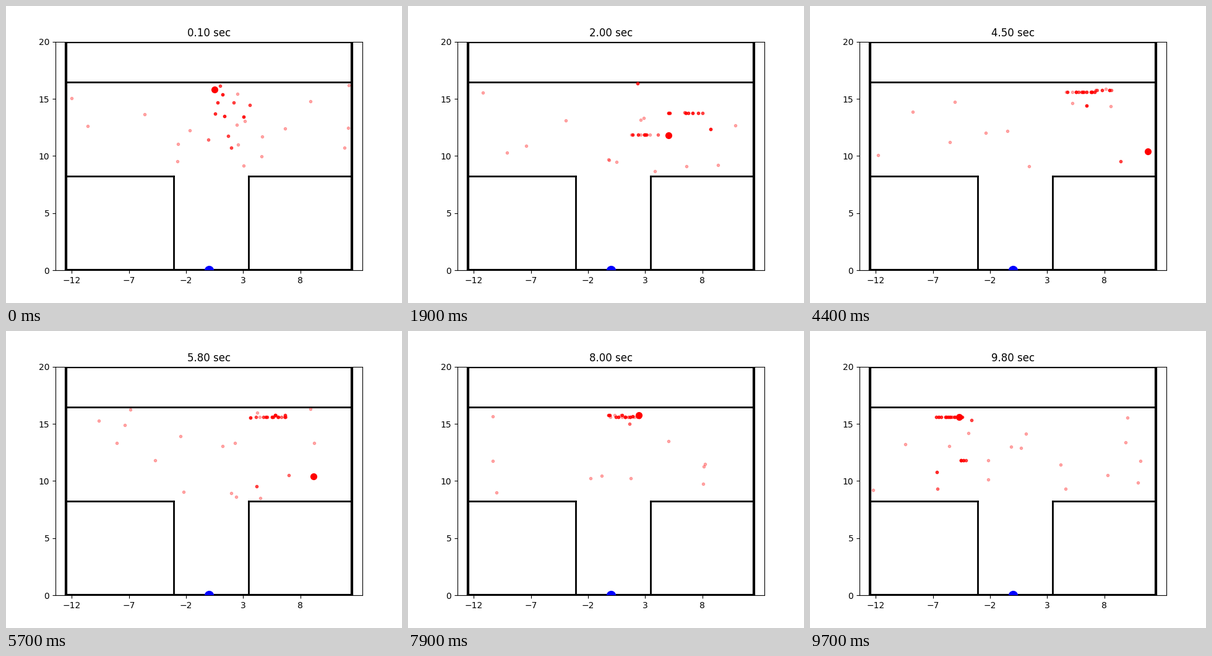
Recreate the animation shown at these times as a matplotlib script. Size 640x480 px, loop 9800 ms.

```python
import matplotlib.pyplot as plt
import numpy as np
from matplotlib.animation import FuncAnimation

FRAMES, INTERVAL = 98, 100
SIDE, TOP, MID = 12.5, 16.45, 8.225
INNER = (-3.07, 3.47)
FLOOR, CEILING = 8.5, 16.35  # heights that particles may take

# Path of the best estimate: x glides, y jumps from lane to lane
STEPS = [0, 9, 28, 44, 70, 88, 97]
BEST_X = [0.46, 3.1, 6.74, 11.77, 6.57, -1.66, -4.73]
BEST_Y = [15.81, 11.82, 15.76, 10.4, 15.76, 11.82, 15.6]

# Centre of the whole cloud
CENTRE = [(0, 1), (9, 2.9), (28, 8), (44, 6.2), (70, 5.4), (88, -1.9), (97, -5.2)]

# Resampled particles slide along lanes: height, count, (step, x) from start to end
LANES = [
    (11.86, 11, [(3, 1.5), (9, 2.6), (28, 3.3), (35, 3.6)]),
    (13.75, 7, [(3, 1.5), (9, 3.6), (28, 9), (34, 10.5)]),
    (14.8, 4, [(2, 1), (14, 3)]),
    (10.15, 3, [(22, 9.8), (33, 10.8)]),
    (15.6, 14, CENTRE[2:]),
    (15.77, 5, [(38, 8.2), (44, 7.9), (70, 4.7), (89, -4.5)]),
    (11.8, 6, [(87, -1.1), (97, -4)]),
]

rng = np.random.default_rng(4)
spreads = [rng.normal(0, 0.75, count) for _, count, _ in LANES]

# Short-lived clumps: a burst at the start, then a steady trickle
born = np.append(np.zeros(14), np.linspace(6, FRAMES, 40))
died = born + rng.uniform(4, 14, len(born))
clump_dx = rng.normal(0, 1.9, len(born))
clump_y = rng.uniform(FLOOR, CEILING, len(born))


def along(path, i):
    return np.interp(i, *zip(*path))


def cloud(i):
    """All particles at step i, stacked ones repeated."""
    rng = np.random.default_rng(100 + i)
    alive = (born <= i) & (i < died)
    xs = [along(CENTRE, i) + clump_dx[alive]]
    ys = [clump_y[alive]]
    for (y, count, path), spread in zip(LANES, spreads):
        if path[0][0] <= i <= path[-1][0]:
            xs.append(along(path, i) + spread + rng.normal(0, 0.15, count))
            ys.append(np.full(count, y))
    stacks = np.column_stack([np.concatenate(xs), np.concatenate(ys)])
    stacks = np.repeat(stacks, rng.integers(1, 6, len(stacks)), axis=0)
    strays = rng.uniform((-12.4, FLOOR), (12.3, CEILING),
                         (rng.integers(9, 16), 2))
    points = np.vstack([stacks, strays])
    return np.clip(points[:, 0], -12.4, 12.3), points[:, 1]


def best(i):
    lane = np.searchsorted(STEPS, i, side="right") - 1
    return [np.interp(i, STEPS, BEST_X)], [BEST_Y[lane]]


fig, ax = plt.subplots(figsize=(6.4, 4.8), dpi=100)
half_width = 10 * 496 / 369.6
ax.set_xlim(-half_width, half_width)
ax.set_ylim(0, 20)
ax.set_xticks(np.arange(-12, 12, 5))
ax.set_yticks(np.arange(0, 21, 5))


def wall(xs, ys, width=2):
    ax.plot(xs, ys, color="black", lw=width)


for x in (-SIDE, SIDE):
    wall((x, x), (0, 20), 3)
for y in (0, 20):
    wall((-SIDE, SIDE), (y, y), 3)
wall((-SIDE, SIDE), (TOP, TOP))
for x, side in zip(INNER, (-SIDE, SIDE)):
    wall((side, x), (MID, MID))
    wall((x, x), (0, MID))

ax.plot(0, 0, "bo", ms=10)
dots, = ax.plot([], [], "r.", ms=6, alpha=0.3)
estimate, = ax.plot([], [], "ro", ms=7)
title = ax.set_title("")


def update(i):
    dots.set_data(*cloud(i))
    estimate.set_data(*best(i))
    title.set_text(f"{(i + 1) / 10:.2f} sec")
    return dots, estimate, title


anim = FuncAnimation(fig, update, frames=FRAMES, interval=INTERVAL,
                     repeat=True, repeat_delay=0)
plt.show()
```
